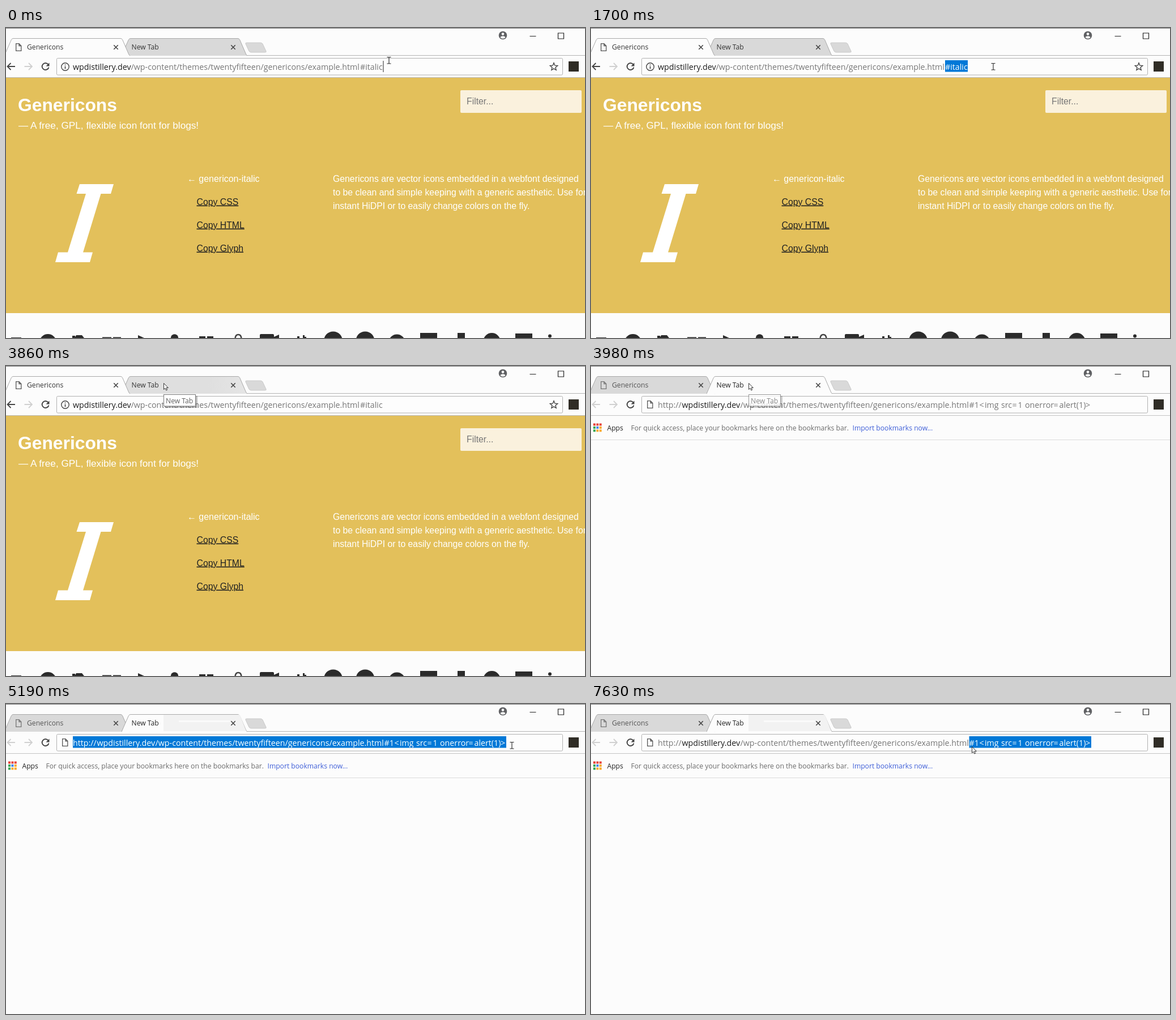
An HTML page that plays this animation: 1022x548 px, repeating every 8 s.

```html
<!DOCTYPE html>
<html lang="en">
<head>
<meta charset="utf-8">
<title>Browser tabs</title>
<style>
html, body { margin: 0; width: 100%; height: 100%; overflow: hidden; background: #fcfcfc; }
svg { display: block; width: 1022px; height: 548px; }
text { white-space: pre; }
.ui { font: 12.15px "Open Sans", "Noto Sans", sans-serif; fill: #333; }
.url { font: 14.25px "Open Sans", "Noto Sans", sans-serif; font-variant-ligatures: none; fill: var(--path, #777); }
.url .host { fill: var(--host, #1c1c1c); }
.white { --path: #fff; --host: #fff; }
.page { font: 15.8px "Liberation Sans", Arial, sans-serif; fill: #fff; }
.link { fill: #222; text-decoration: underline; }
.line { fill: none; stroke: #444; stroke-width: 1.6; }
.pale { stroke: #d0d0d0; }
.tab { stroke: #a9a9a9; stroke-width: 1; }
.on { fill: #fcfcfc; }
.off { fill: #d9d9d9; }
</style>
</head>
<body>
<svg viewBox="0 0 1022 548">
<defs>
  <path id="tab" d="M-3 49L9.500 20.500Q10.500 18.500 13 18.500H202Q204.500 18.500 205.500 20.500L216.500 46Q217.500 48.500 219 49"/>
  <path id="doc" d="M.7.700H6L9.800 4.500V13.300H.7ZM6 .7V4.500H9.800" fill="none" stroke-width="1.300"/>
  <path id="cross" d="M-3.700 -3.700L3.700 3.700M3.700 -3.700L-3.700 3.700" class="line"/>
  <path id="arrow" d="M6.500 -6L.5 0L6.500 6M.5 0H14" fill="none" stroke-width="1.800"/>
  <radialGradient id="glow" gradientUnits="userSpaceOnUse" cx="280" cy="34" r="130">
    <stop offset="0" stop-color="#eaeaea"/><stop offset="1" stop-color="#dfdfdf"/>
  </radialGradient>
  <clipPath id="picked"><rect id="range" y="57" height="20.500" width="0"/></clipPath>
  <g id="urlA" class="url">
    <text class="host" x="118" y="74">wpdistillery.dev</text>
    <text x="220.500" y="74">/wp-content/themes/twentyfifteen/genericons/example.html</text>
    <text x="625" y="74">#italic</text>
  </g>
  <g id="urlB" class="url">
    <text x="118" y="74">http://</text>
    <text class="host" x="160.500" y="74">wpdistillery.dev</text>
    <text x="263.500" y="74">/wp-content/themes/twentyfifteen/genericons/example.html</text>
    <text y="74"><tspan x="667.500">#1</tspan><tspan x="685.500">&lt;</tspan><tspan x="695">img</tspan><tspan x="724">src</tspan><tspan x="743.500">=</tspan><tspan x="753.500">1</tspan><tspan x="766">onerror</tspan><tspan x="816.500">=</tspan><tspan x="826.500">alert(1)</tspan><tspan x="873">&gt;</tspan></text>
  </g>
</defs>

<rect width="1022" height="548" fill="#fcfcfc"/>
<path d="M0 .5H1022" stroke="#7c7c7c"/>
<path d="M0 48.500H1022" stroke="#b3b3b3"/>
<path d="M425 26Q422 26 423 28L429 41Q430 43 433 43H457Q460 43 459 41L453 28Q452 26 449 26Z" fill="#d9d9d9" stroke="#cacaca"/>

<!-- window buttons -->
<circle cx="877" cy="13" r="7.300" fill="#5f6063"/>
<circle cx="877" cy="10.600" r="2.300" fill="#fcfcfc"/>
<path d="M872.500 16.800Q873 14.200 877 14.200T881.500 16.800Q879.500 18.700 877 18.700T872.500 16.800Z" fill="#fcfcfc"/>
<path d="M924.500 14.500H935.500M974.500 9H984.500V19H974.500Z" fill="none" stroke="#222" stroke-width="1.200"/>

<!-- toolbar -->
<rect x="89.500" y="53.500" width="893" height="29.500" rx="2" fill="#fdfdfd" stroke="#b1b1b1"/>
<use href="#arrow" transform="translate(39 68)scale(-1 1)translate(-7.500 0)" stroke="#d0d0d0"/>
<path d="M74.300 64.200A6 6 0 1 0 75.500 69.500" class="line" style="stroke-width:1.900"/>
<path d="M76.500 61.500V67.500H70.500Z" fill="#444"/>
<rect x="993" y="59" width="18" height="18" fill="#302d26"/>

<g id="first">
  <use href="#tab" id="back" x="207" class="tab off"/>
  <use href="#tab" class="tab on"/>
  <use href="#doc" x="17" y="27" stroke="#555"/>
  <text class="ui" x="37" y="38">Genericons</text>
  <text class="ui" x="221.500" y="38">New Tab</text>
  <use href="#arrow" x="2" y="68" stroke="#444"/>
  <circle cx="104.500" cy="68.500" r="6.700" class="line" style="stroke-width:1.400"/>
  <path d="M104.500 67.500V72.300M104.500 64.500V66.100" class="line"/>
  <path id="star" class="line" style="stroke-width:1.400"/>
  <use href="#urlA"/>
  <path id="caret" d="M666 58V78" stroke="#222"/>
  <path d="M0 87.500H1022" stroke="#b9b9b9"/>
  <rect y="88" width="1022" height="416" fill="#e3c05b"/>
  <g class="page">
    <text x="21" y="146.500" font-weight="bold" style="font-size:31.800px">Genericons</text>
    <text x="22" y="178" style="font-size:17.200px">— A free, GPL, flexible icon font for blogs!</text>
    <rect x="802" y="110" width="214" height="40" rx="2" fill="#faf1dd"/>
    <text x="813" y="135" fill="#777">Filter...</text>
    <path d="M130 276H190L185 293H167.500L136 396.500H153L148 414H87L92 396.500H109L141 293H124.500Z"/>
    <text x="320" y="271.500" style="font-size:15.950px">← genericon-italic</text>
    <text class="link" x="336.500" y="312.500">Copy CSS</text>
    <text class="link" x="336.500" y="353.500">Copy HTML</text>
    <text class="link" x="336.500" y="394.500">Copy Glyph</text>
    <text x="577" y="272">Genericons are vector icons embedded in a webfont designed</text>
    <text x="577" y="296">to be clean and simple keeping with a generic aesthetic. Use for</text>
    <text x="577" y="320">instant HiDPI or to easily change colors on the fly.</text>
  </g>
  <g fill="#2b2b2b">
    <path d="M9 547H27V548H9ZM170 546.500H186V548H170ZM189 546.500H203V548H189ZM117 544H122V548H117ZM124 543H134L138 548H121ZM233 543L244 548H233ZM341 545H352V548H341ZM355 545H366V548H355ZM448 543Q448 541 450 541H471Q473 541 473 543V546L482 542V548H448ZM514 545H518V548H514ZM524 543H527V546H530V548H524Z"/>
    <circle cx="74" cy="556" r="15"/>
    <circle cx="297.500" cy="548" r="6.800"/>
    <path d="M404.500 549Q405 542 410 542T415.500 549" class="line" style="stroke-width:2.500"/>
    <circle cx="577.500" cy="553" r="16.500"/>
    <circle cx="634" cy="553" r="16.500"/>
    <circle cx="690" cy="556" r="14.500"/>
    <rect x="731" y="539" width="30" height="30"/>
    <rect x="797" y="539" width="13" height="13"/>
    <circle cx="857.500" cy="554" r="15"/>
    <rect x="899" y="540" width="30" height="30"/>
    <circle cx="960" cy="544.500" r="3"/>
  </g>
</g>

<g id="second">
  <use href="#tab" class="tab off"/>
  <use href="#tab" x="207" class="tab on"/>
  <g id="shade">
    <path d="M278 19H411Q413 19 413.500 21L424 48H278Z" fill="#f2f2f2"/>
    <path d="M305 30.500H395" stroke="#fafafa" stroke-width="3"/>
  </g>
  <use href="#doc" x="17" y="27" stroke="#777"/>
  <text class="ui" x="37" y="38" style="fill:#555">Genericons</text>
  <text class="ui" x="221.500" y="38" style="fill:#222">New Tab</text>
  <use href="#arrow" x="2" y="68" stroke="#d0d0d0"/>
  <use href="#doc" x="99" y="61" stroke="#555"/>
  <use href="#urlB"/>
  <path d="M0 87.500H1022" stroke="#c4c4c4"/>
  <path d="M0 130.500H1022" stroke="#dcdcdc"/>
  <g id="apps"></g>
  <g class="ui">
    <text x="28.500" y="113.500" style="fill:#222">Apps</text>
    <text x="70.500" y="113.500" style="fill:#6a6a6a">For quick access, place your bookmarks here on the bookmarks bar.</text>
    <text x="461.500" y="113.500" style="fill:#3f5fd8">Import bookmarks now...</text>
  </g>
</g>

<use href="#cross" x="194" y="34"/>
<use href="#cross" x="401" y="34"/>

<g clip-path="url(#picked)">
  <rect y="57" width="1022" height="21" fill="#0078d7"/>
  <use id="pickedUrl" class="white" href="#urlA"/>
</g>

<g id="tip">
  <rect x="281" y="53" width="57" height="21" fill="#000" opacity=".25"/>
  <rect x="278.500" y="50.500" width="56" height="20.500" fill="#fff" stroke="#777"/>
  <text class="ui" x="282" y="65.500" style="fill:#606060">New Tab</text>
</g>

<g id="cursor">
  <path id="beam" d="M-3.500 -5.500H-1L0 -5L1 -5.500H3.500M0 -5V5.500M-3.500 6H-1L0 5.500L1 6H3.500" fill="none" stroke="#222" stroke-width="1.100"/>
  <path id="pointer" d="M.5.500V11.500L3 9.200L4.800 13L6.600 12.200L4.900 8.500H8.300Z" fill="#fff" stroke="#222" stroke-width=".9"/>
</g>
</svg>
<script>
const LOOP = 8000;
const $ = id => document.getElementById(id);
const set = (id, attrs) => Object.entries(attrs).forEach(([k, v]) => $(id).setAttribute(k, v));
const show = (id, on) => set(id, { visibility: on ? 'visible' : 'hidden' });

// Pointer moves: start, end, number of hops, waypoints.
const moves = [
  [130, 1130, 8, [[676, 57], [667, 69], [625, 70]]],
  [1410, 1700, 3, [[625, 70], [670, 72], [710, 68]]],
  [2640, 3430, 7, [[710, 68], [718, 110], [560, 192], [330, 120], [278, 30]]],
  [4130, 4650, 5, [[278, 30], [790, 18], [880, 62]]],
  [4800, 5190, 4, [[880, 62], [894, 88], [893, 73]]],
  [5570, 6530, 8, [[893, 73], [889, 70], [884, 66], [859, 63], [750, 66]]],
  [6690, 6690, 1, [[750, 66], [718, 68]]],
  [6960, 7230, 3, [[718, 68], [671, 72]]],
  [7630, 7630, 1, [[671, 72], [672, 75]]]
];

// Selected range of the address: time, left, right.
const ranges = [
  [0, 0, 0], [700, 655, 665], [844, 643, 665], [987, 634, 665], [1130, 625, 665],
  [2360, 0, 0], [5060, 118, 883], [5570, 0, 0], [6255, 869, 883], [6392, 805, 883],
  [6530, 754, 883], [6690, 720, 883], [6960, 695, 883], [7095, 677, 883], [7230, 667.5, 883]
];

const tipLevels = [[0, 0], [3730, 0.5], [3860, 1], [3980, 0.75], [4130, 0]];

const latest = (rows, t) => rows.filter(row => row[0] <= t).pop();
const within = (t, a, b) => t >= a && t < b;

function along(path, p) {
  const s = p * (path.length - 1);
  const i = Math.min(Math.floor(s), path.length - 2);
  return [0, 1].map(k => path[i][k] + (path[i + 1][k] - path[i][k]) * (s - i));
}

function pointerAt(t) {
  const move = latest(moves, t);
  if (!move) return moves[0][3][0];
  const [start, end, hops, path] = move;
  const gap = (end - start) / (hops - 1) || 1;
  const hop = Math.min(hops, Math.floor((t - start) / gap + 1e-6) + 1);
  return along(path, hop / hops);
}

function draw(t) {
  const second = t >= 3980;
  show('first', !second);
  show('second', second);
  show('shade', t >= 4130);
  show('caret', t < 700 || within(t, 2360, 2900));
  $('back').style.fill = within(t, 3430, 3980) ? 'url(#glow)' : '';
  set('tip', { opacity: latest(tipLevels, t)[1] });

  const [, left, right] = latest(ranges, t);
  set('range', { x: left, width: right - left });
  set('pickedUrl', { href: second ? '#urlB' : '#urlA' });

  const [x, y] = pointerAt(t);
  const dragging = within(t, 130, 1410) || within(t, 5570, 7630);
  const inField = x > 89 && x < 982 && y > 53 && y < 84;
  const beam = inField && (dragging || x < left || x > right);
  set('cursor', { transform: `translate(${x} ${y})` });
  show('beam', beam);
  show('pointer', !beam);
}

const starPoint = (_, i) => {
  const a = i * Math.PI / 5, r = i % 2 ? 3.1 : 7;
  return `${967 + r * Math.sin(a)} ${68.7 - r * Math.cos(a)}`;
};
set('star', { d: `M${Array.from({ length: 10 }, starPoint).join('L')}Z` });

const [red, green, blue, amber] = ['#e8453c', '#3aa757', '#4285f4', '#f9ab2d'];
$('apps').innerHTML = [red, red, red, green, blue, amber, green, amber, amber]
  .map((c, i) => `<rect x="${4 + i % 3 * 5.4}" y="${101.5 + Math.floor(i / 3) * 5.4}" width="4" height="4" fill="${c}"/>`)
  .join('');

let begin;
function tick(now) {
  begin ??= now;
  draw((now - begin) % LOOP);
  requestAnimationFrame(tick);
}
draw(0);
requestAnimationFrame(tick);
</script>
</body>
</html>
```
